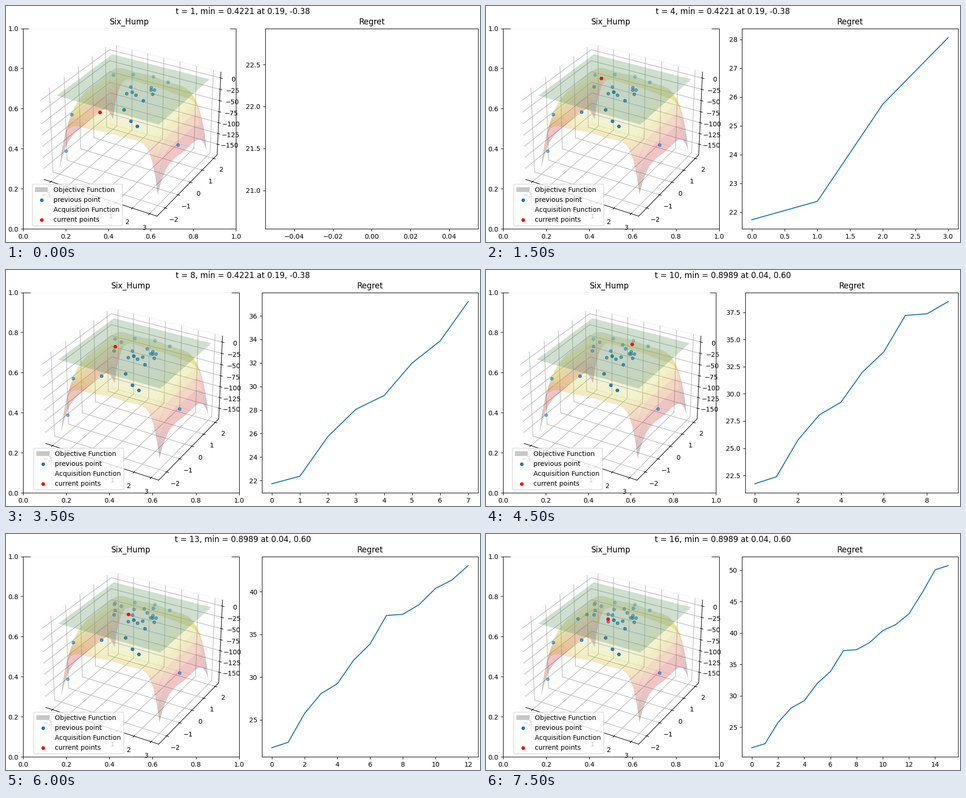
Animation of 1000x500 px, one loop 8000 ms. Source, as a matplotlib script:

```python
import numpy as np
import matplotlib.pyplot as plt
from matplotlib.animation import FuncAnimation
from matplotlib.colors import ListedColormap
from matplotlib.patches import Patch

W, H = 1000, 500
LEFT, RIGHT, BOTTOM, TOP = 35.97, 995.83, 27.9, 452.45
WIDE, NARROW = 449.0, 455.7      # axes widths in pixels
BLUE, RED, GREEN = "#1f77b4", "red", (.25, .5, .25)
PEAK = 1.0316                    # highest value of the objective

# Points chosen by the optimiser, in order; all else follows from them
CHOSEN = np.array([
    (-.7, -1.638), (.17, -.358), (-1.08, -.29), (-1.23, .424),
    (.372, .4), (.775, .175), (.602, -.233), (-1.29, .042),
    (.04, .6), (.4, .842), (-1.636, .398), (-.418, .394),
    (-.425, -.034), (-1.42, -.4), (-1.58, -.855), (-.158, -.383),
])
# Outlying starting samples; the others are scattered over the plateau
OUTER = [(.19, -.38), (-2.25, -2.3), (2.92, -.37), (1.59, -1.75),
         (1.15, -1.67), (.55, -1.42), (-2.38, -1.7)]
rng = np.random.default_rng(4)
START = np.vstack([OUTER, rng.uniform((-2.3, -.9), (1.2, 1.4), (12, 2))])


def six_hump(x, y):
    return -((4 - 2.1 * x**2 + x**4 / 3) * x**2 + x * y + (4 * y**2 - 4) * y**2)


def padded(lo, hi):
    """Data limits with a 5% margin and the usual 1/48 box margin."""
    for part in (1 / 20, 1 / 48):
        d = (hi - lo) * part
        lo, hi = lo - d, hi + d
    return lo, hi


def place(ax, x, width):
    ax.set_position([x / W, BOTTOM / H, width / W, (TOP - BOTTOM) / H])


def dots(points, color, zorder):
    x, y = points.T
    return box.scatter(x, y, six_hump(x, y), s=20, c=color, linewidths=1,
                       zorder=zorder)


fig = plt.figure(figsize=(W / 100, H / 100), dpi=100, facecolor="white")
left = fig.add_axes([.04, .06, .45, .84])
regret = fig.add_axes([.54, .06, .45, .84])
box = fig.add_axes([.04, .06, .45, .84], projection="3d", computed_zorder=False)
left.set_title("Six_Hump")
heading = fig.suptitle("", y=1 - 3.1 / H, va="top")

# A slightly muted heat scale
heat = ListedColormap(.08 + .72 * plt.get_cmap("hot")(np.linspace(0, 1, 256))[:, :3])
X, Y = np.meshgrid(np.linspace(-3, 3, 50), np.linspace(-2, 2, 50))
Z = six_hump(X, Y)
box.plot_surface(X, Y, Z, cmap=heat, alpha=.25, zorder=1)
box.plot_surface(X, Y, np.full_like(X, .4), cmap=ListedColormap([GREEN]),
                 alpha=.25, zorder=3)

for axis in (box.xaxis, box.yaxis, box.zaxis):
    axis.pane.fill = False
box.set_xticks(range(-3, 4))
box.set_yticks(range(-2, 3))
box.set_zticks(range(-150, 1, 25))

keys = [left.scatter([], [], s=20, c=color) for color in (BLUE, RED)]
left.set(xlim=(0, 1), ylim=(0, 1))
box.legend([Patch(facecolor="#cbc5c5", edgecolor="none"), keys[0],
            Patch(facecolor="none", edgecolor="none"), keys[1]],
           ["Objective Function", "previous point",
            "Acquisition Function", "current points"], loc="lower left")

losses = np.cumsum(PEAK - six_hump(*CHOSEN.T))
shown = []


def update(i):
    t = i + 1
    best = "0.4221 at 0.19, -0.38" if t < 9 else "0.8989 at 0.04, 0.60"
    heading.set_text(f"t = {t}, min = {best}")

    # Tick labels with a decimal take room from both axes
    width = WIDE if t < 3 or 10 <= t <= 12 else NARROW
    place(left, LEFT, width)
    place(box, LEFT, width)
    place(regret, RIGHT - width, width)

    while shown:
        shown.pop().remove()
    shown.append(dots(np.vstack([START, CHOSEN[:i]]), BLUE, 2))
    shown.append(dots(CHOSEN[i:t], RED, 4))
    box.set_xlim(*padded(-3, 3))
    box.set_ylim(*padded(START[:, 1].min(), 2))
    box.set_zlim(*padded(Z.min(), PEAK))

    regret.clear()
    regret.set_title("Regret")
    regret.plot(range(t), losses[:t], color=BLUE)


anim = FuncAnimation(fig, update, frames=len(CHOSEN), interval=500,
                     repeat=True, repeat_delay=0)
plt.show()
```
